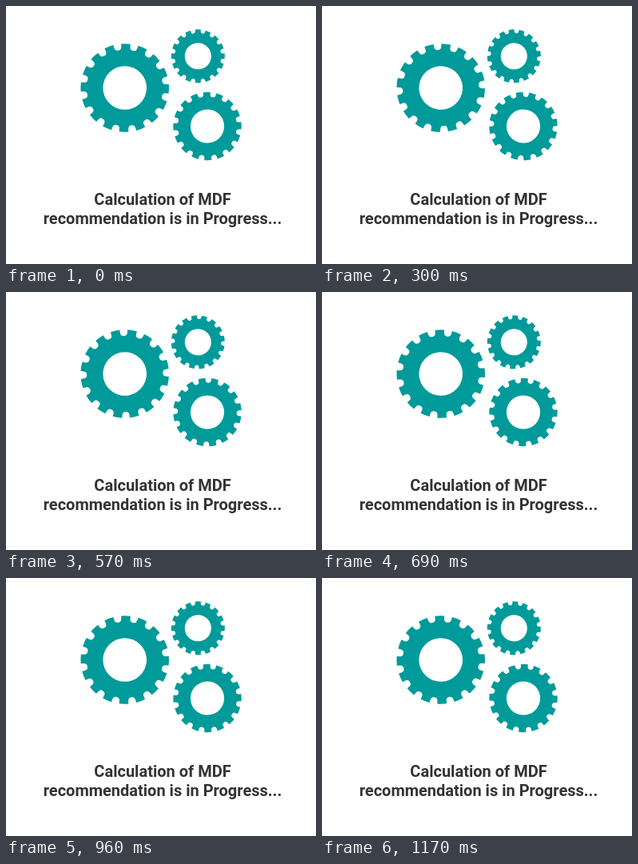
An HTML page for the animation above (1200 ms loop, 388 by 323 pixels).

```html
<!DOCTYPE html>
<html lang="en">
<head>
<meta charset="utf-8">
<title>Progress</title>
<style>
html, body { margin: 0; width: 100%; height: 100%; overflow: hidden; background: #fff; }
svg { display: block; width: 388px; height: 323px; }
path { fill: #009a9a; fill-rule: evenodd; }
text { font: 700 20px Roboto, sans-serif; fill: #333; text-anchor: middle; }
</style>
</head>
<body>
<svg viewBox="0 0 388 323">
  <g id="gears"></g>
  <text x="196" y="249">Calculation of MDF</text>
  <text x="196" y="273">recommendation is in Progress...</text>
</svg>
<script>
const LOOP = 1200, STEP = 30;
const TEETH = 16, PITCH = 360 / TEETH;
const TURN = 5 * PITCH; // degrees per loop

// r: outer radius, phase: starting angle in degrees, dir: 1 is clockwise
const gears = [
  { x: 148.7, y: 102.5, r: 55.3, phase: 1.3, dir: 1 },
  { x: 240.3, y: 62.8, r: 33.5, phase: 0, dir: -1 },
  { x: 252, y: 150.5, r: 42.7, phase: -1, dir: -1 }
];

function outline(r) {
  const root = r * .86, mid = r * .93, hole = r * .494;
  const at = (radius, turn) => {
    const a = turn * PITCH * Math.PI / 180;
    return `${(radius * Math.sin(a)).toFixed(2)} ${(-radius * Math.cos(a)).toFixed(2)}`;
  };
  let d = "";
  for (let i = 0; i < TEETH; i++) {
    d += `${i ? "L" : "M"}${at(r, i - .27)}A${r} ${r} 0 0 1 ${at(r, i + .27)}`;
    d += `L${at(mid, i + .28)}Q${at(root, i + .29)} ${at(root, i + .5)}`;
    d += `Q${at(root, i + .71)} ${at(mid, i + .72)}`;
  }
  return `${d}ZM${hole} 0A${hole} ${hole} 0 1 0 ${-hole} 0A${hole} ${hole} 0 1 0 ${hole} 0Z`;
}

const layer = document.getElementById("gears");
for (const g of gears) {
  g.node = document.createElementNS("http://www.w3.org/2000/svg", "path");
  g.node.setAttribute("d", outline(g.r));
  layer.append(g.node);
}

const start = performance.now();
function draw() {
  const t = Math.floor((performance.now() - start) % LOOP / STEP) * STEP / LOOP;
  for (const { node, x, y, phase, dir } of gears) {
    node.setAttribute("transform", `translate(${x} ${y}) rotate(${phase + dir * t * TURN})`);
  }
  requestAnimationFrame(draw);
}
draw();
</script>
</body>
</html>
```
